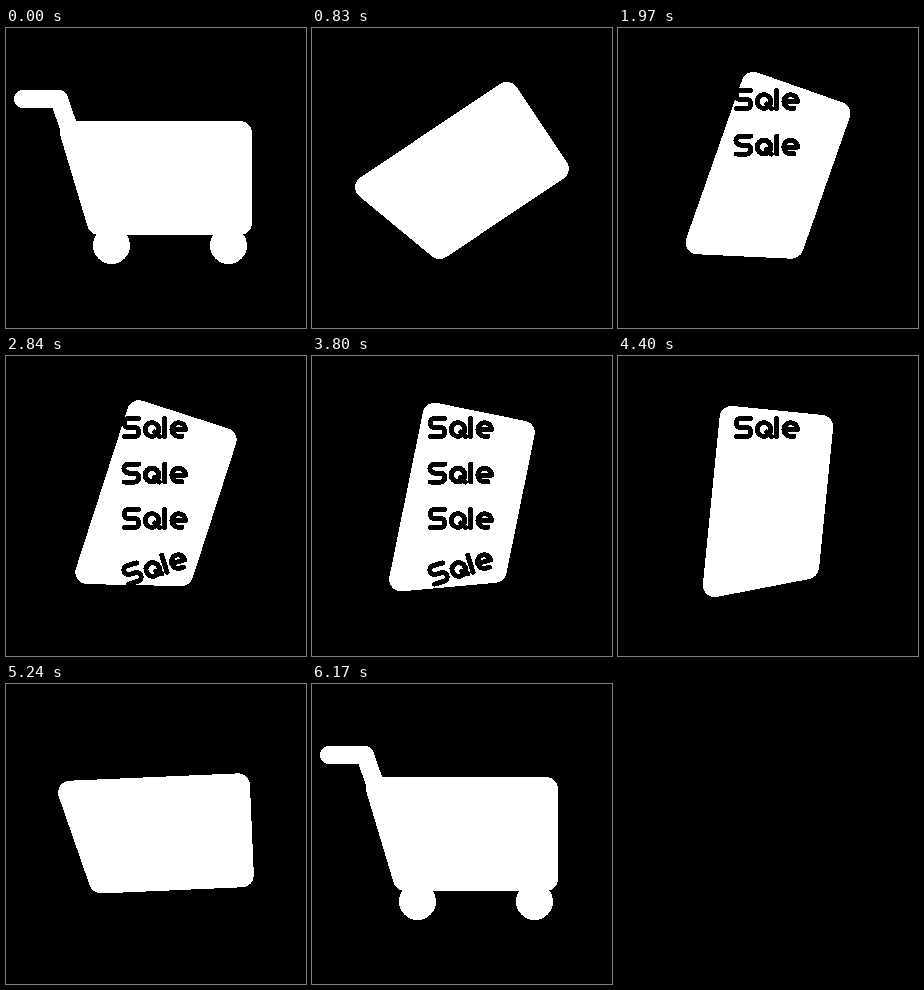
Recreate the animation shown at these times as an HTML page. Size 300x300 px, loop 8000 ms.

```html
<!DOCTYPE html>
<html lang="en">
<head>
<meta charset="utf-8">
<title>Cart sale</title>
<style>
  html, body { margin: 0; width: 100%; height: 100%; overflow: hidden; background: #000; }
  svg { display: block; width: 100vw; height: 100vh; shape-rendering: crispEdges; }
  path { stroke-linecap: round; stroke-linejoin: round; }
</style>
</head>
<body>
<svg viewBox="0 0 300 300">
  <defs>
    <!-- rounded single-stroke lettering: S, a, l, e -->
    <path id="sale" fill="none" stroke="#000" stroke-width="5" d="
      M-17 -9 H-27 a4.5 4.5 0 0 0 0 9 H-21 a4.5 4.5 0 0 1 0 9 H-31
      M-10.3 2 a6.8 6.8 0 1 1 13.6 0 a6.8 6.8 0 1 1 -13.6 0 M-1 4.5 L4 9
      M9.3 -9 V9
      M16.4 2 H30 a6.8 6.8 0 1 0 -6.8 6.8 H26.5"/>
  </defs>
  <rect width="300" height="300"/>
  <path id="handle" d="M64 103 L53 71 H17" pathLength="1" fill="none" stroke="#fff"
    stroke-width="18" stroke-dasharray="1 2"/>
  <circle class="wheel" cx="105.5" cy="217.5" r="18.5" fill="#fff"/>
  <circle class="wheel" cx="222.5" cy="217.5" r="18.5" fill="#fff"/>
  <path id="basket" d="M66 105 H234 V195 H93 Z" fill="#fff" stroke="#fff" stroke-width="24"/>
  <g id="words" role="img" aria-label="Sale Sale Sale Sale">
    <use href="#sale" transform="translate(149.5 71.5)"/>
    <use href="#sale" transform="translate(149.5 117)"/>
    <use href="#sale" transform="translate(149.5 162.5)"/>
    <use href="#sale" transform="translate(149.5 210.5) rotate(-17)"/>
  </g>
</svg>
<script>
const LOOP = 8000, STEP = 30, SWING = 19.5;
const handle = document.getElementById('handle');
const basket = document.getElementById('basket');
const wheels = document.querySelectorAll('.wheel');
const words = document.querySelectorAll('#words use');

const ramp = (t, a, b) => Math.min(1, Math.max(0, (t - a) / (b - a)));
const easeOut = (u, p) => 1 - Math.pow(1 - u, p);

// Tip upright, lean over and back, then drop flat again.
function angle(t) {
  if (t < 1000) return -90 * easeOut(ramp(t, 785, 1000), 2);
  if (t < 2100) return -90 + SWING * easeOut(ramp(t, 1000, 2100), 2.4);
  if (t < 4940) return -90 + SWING * Math.cos(ramp(t, 2100, 4940) * Math.PI / 2);
  return -90 * (1 - easeOut(ramp(t, 4940, 5300), 2));
}

// 1 = handle and wheels fully out, 0 = tucked away
const parts = t => t < 3000 ? 1 - ramp(t, 475, 590) : ramp(t, 6020, 6170);

function draw(t) {
  const k = parts(t);
  handle.setAttribute('stroke-dashoffset', 1 - k);
  handle.style.visibility = k > 0 ? 'visible' : 'hidden';
  wheels.forEach(w => w.setAttribute('r', 18.5 * k));
  basket.setAttribute('transform', `rotate(${angle(t)} 150 150)`);
  words.forEach((w, i) => {
    const on = t >= 1500 + 300 * i && t < 4600 - 200 * i;
    w.style.visibility = on ? 'visible' : 'hidden';
  });
}

const start = performance.now();
function tick() {
  const t = (performance.now() - start) % LOOP;
  // moves advance in 30 ms steps; the cart rests until 500
  draw(t < 500 ? 0 : Math.floor((t - 20) / STEP) * STEP + 20);
  requestAnimationFrame(tick);
}
tick();
</script>
</body>
</html>
```
